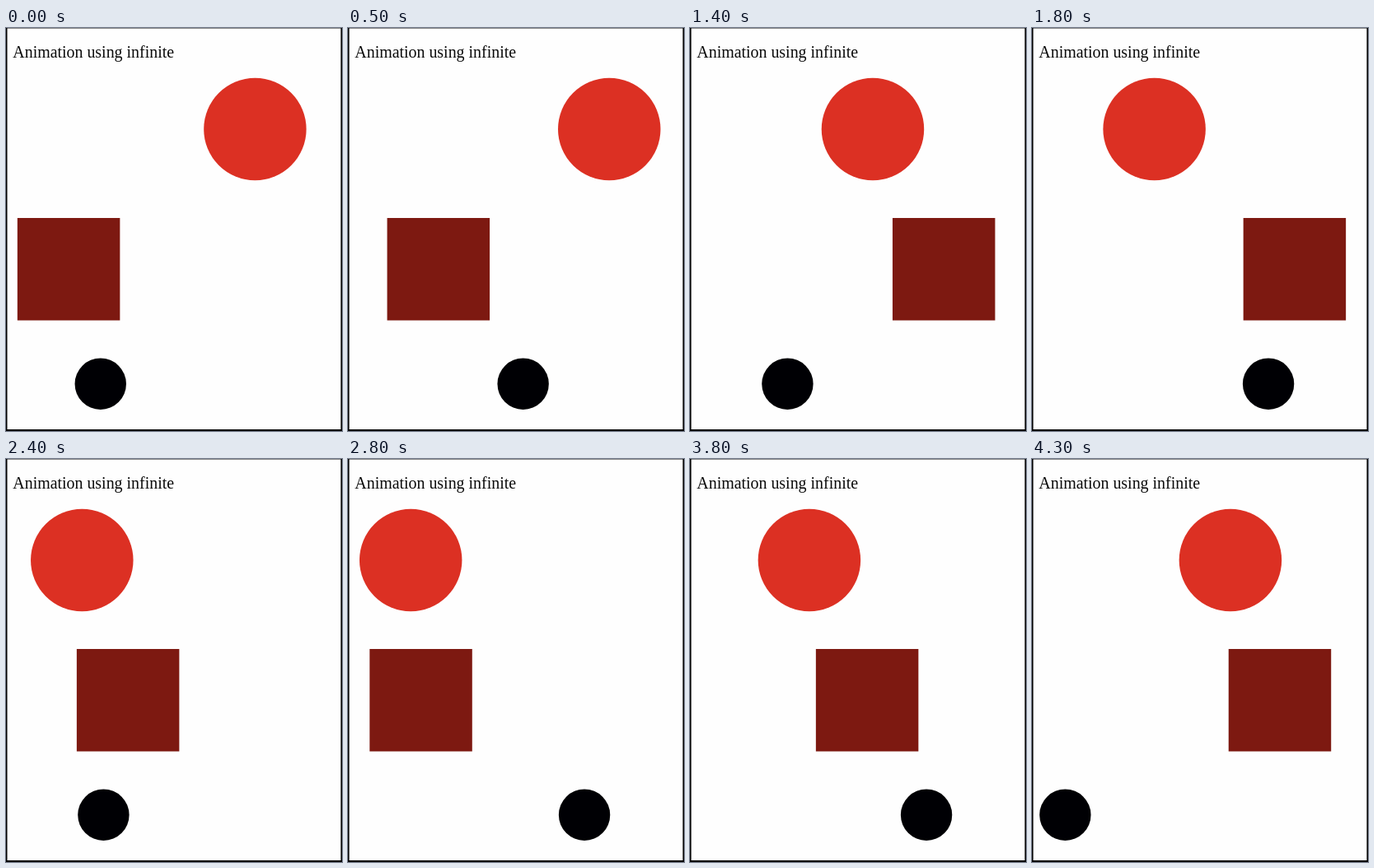
Write an HTML page that moves like this. It is 408 px wide and 490 px high and loops after 4400 ms.

```html
<!DOCTYPE html>
<html lang="en">
<head>
<meta charset="utf-8">
<title>Infinite animation</title>
<style>
  html, body { margin: 0; width: 100%; height: 100%; overflow: hidden; background: #fefefe; }
  svg { display: block; width: 100%; height: 100%; }
  text { font: 19.92px "Liberation Serif", "Times New Roman", serif; fill: #0a0a0a; }
</style>
</head>
<body>
<svg viewBox="0 0 408 490">
  <rect width="408" height="490" fill="#fefefe"/>
  <rect width="408" height="1" fill="#8c8c8c"/>
  <rect width="1.5" height="490"/>
  <rect x="406.5" width="1.5" height="490"/>
  <rect y="488" width="408" height="2"/>
  <text x="8.3" y="36">Animation using infinite</text>
  <circle id="red" cx="62.25" cy="123" r="62.25" fill="#dc3023"/>
  <rect id="box" y="231" width="124.5" height="124.5" fill="#7d1911"/>
  <circle id="dot" cx="31.2" cy="432.7" r="31.2" fill="#000004"/>
</svg>
<script>
const LOOP = 4400, STEP = 100;
const START = 3295;              // all three shapes leave the left edge together
const LEFT = 8, TRAVEL = 249;

const movers = [['red', 5000], ['box', 3000], ['dot', 1000]]
  .map(([id, period]) => ({ el: document.getElementById(id), period }));

// CSS "ease": cubic-bezier(.25, .1, .25, 1)
function ease(x) {
  let lo = 0, hi = 1;
  for (let i = 0; i < 30; i++) {
    const s = (lo + hi) / 2;
    if (0.75 * s * (1 - s) + s ** 3 < x) lo = s; else hi = s;
  }
  const s = (lo + hi) / 2, r = 1 - s;
  return 0.3 * s * r * r + 3 * s * s * r + s ** 3;
}

// Out during the first half, back during the second, each half eased
function swing(t, period) {
  const p = ((t - START) / period % 1 + 1) % 1 * 2;
  return p < 1 ? ease(p) : 1 - ease(p - 1);
}

function draw(now) {
  const t = Math.floor((now + 15) / STEP) * STEP % LOOP;
  for (const { el, period } of movers) {
    const x = LEFT + TRAVEL * swing(t, period);
    el.setAttribute('transform', `translate(${x.toFixed(2)} 0)`);
  }
}

function tick() {
  draw(performance.now());
  requestAnimationFrame(tick);
}
draw(0);
requestAnimationFrame(tick);
</script>
</body>
</html>
```
